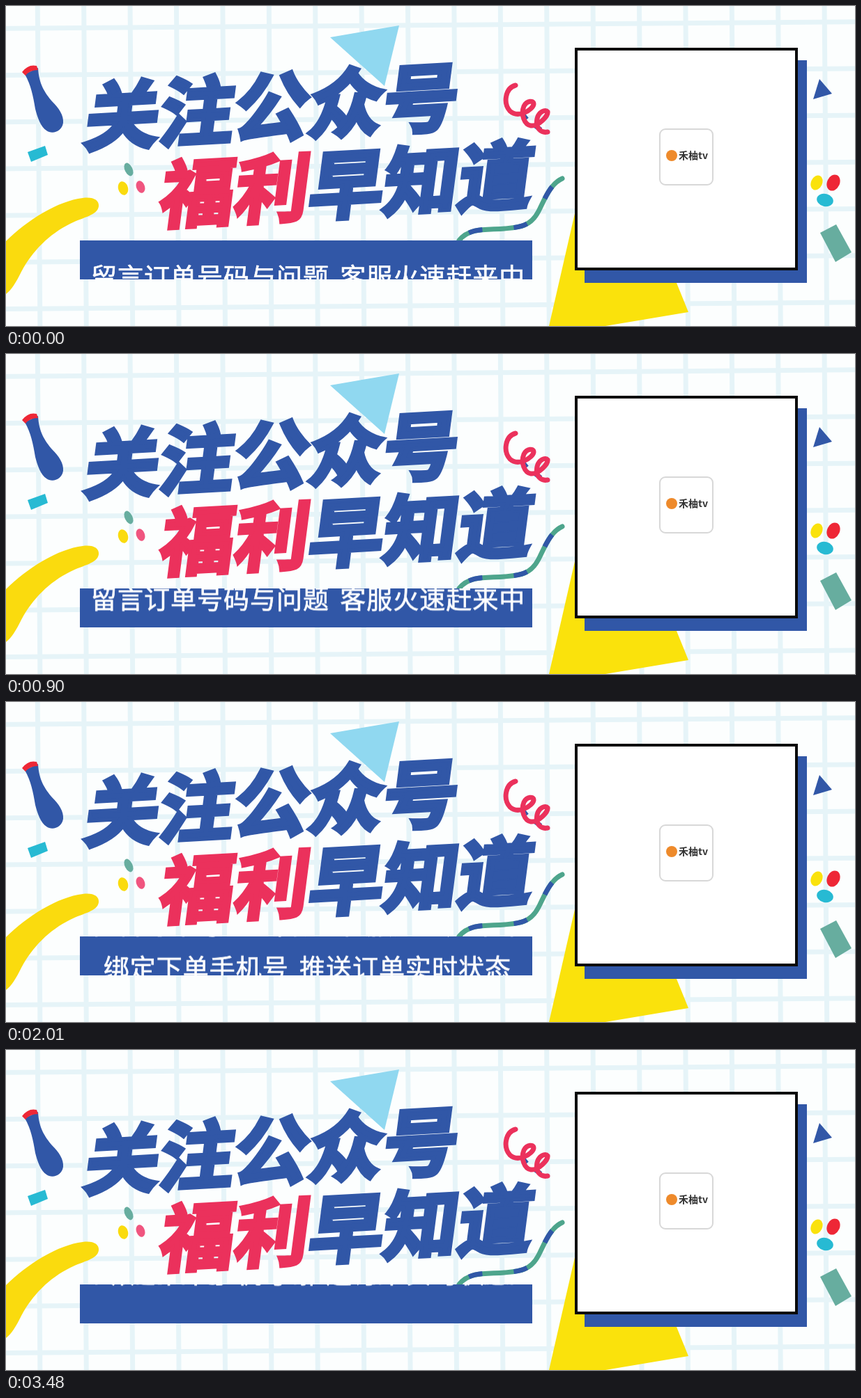
An HTML page that plays this animation: 1218 px wide and 460 px high, repeating every 3.51 s.

```html
<!DOCTYPE html>
<html lang="zh-CN">
<head>
<meta charset="utf-8">
<title>关注公众号 福利早知道</title>
<style>
  html, body { margin: 0; width: 100%; height: 100%; overflow: hidden; background: #fcfefe; }
  svg { display: block; width: 1218px; height: 460px; }
  text { font-family: "Noto Sans CJK SC", "Noto Sans CJK", "Noto Sans SC", sans-serif; }
  .blue { fill: #3157a7; }
  .red { fill: #ee2736; }
  .pink { fill: #eb315c; }
  .yellow { fill: #fae20c; }
  .cyan { fill: #27bad3; }
  .green { fill: #67ad9f; }
  .line { fill: none; stroke-width: 7; }
  .title { font-size: 107px; font-weight: 900; stroke-width: 6; stroke-linejoin: miter; }
  .title .blue { stroke: #3157a7; }
  .title .pink { stroke: #eb315c; stroke-width: 5; }
  .notice { font-size: 37px; font-weight: 500; letter-spacing: 1px; word-spacing: 6px; fill: #fff; stroke: #fff; stroke-width: .7; }
  .brand { font-size: 14px; font-weight: 700; fill: #333; }
</style>
</head>
<body>
<svg viewBox="0 0 1218 460">
  <defs>
    <pattern id="grid" width="66.4" height="67.2" patternUnits="userSpaceOnUse"
             patternTransform="translate(42 28.5) rotate(-.45)">
      <path d="M3.5 0V67.2M0 3.5H66.4" stroke="#e6f4f8" stroke-width="7"/>
    </pattern>
    <clipPath id="bar"><rect x="106" y="337" width="649" height="56"/></clipPath>
    <path id="ribbon" d="M650 337C665 318 690 322 715 320C735 318 752 318 764 295C772 280 780 256 798 248"/>
  </defs>

  <rect width="1218" height="460" fill="#fcfefe"/>
  <rect width="1218" height="460" fill="url(#grid)"/>

  <!-- confetti, left -->
  <path class="blue" d="M27 98L46 89C47 112 56 125 66 137C76 147 83 157 82 168C80 181 66 185 58 179C50 174 45 160 42 148C39 130 36 114 27 98Z"/>
  <path class="red" d="M23 95Q32 83 44 86L46 92Q34 92 28 100Z"/>
  <path class="cyan" d="M31 210L56 201L60 214L36 224Z"/>
  <ellipse class="green" rx="5.5" ry="10" transform="translate(176 235) rotate(-25)"/>
  <ellipse fill="#fadb0e" rx="7" ry="10" transform="translate(168 262) rotate(-15)"/>
  <ellipse fill="#f0557f" rx="6" ry="9" transform="translate(193 260) rotate(-20)"/>
  <path fill="#fadb0e" d="M0 338C30 308 75 280 110 276C125 274 134 279 133 288C131 301 112 303 92 313C62 328 38 352 22 382C14 398 8 408 0 414Z"/>
  <path fill="#90d8f0" d="M465 45L564 28L543 115Z"/>

  <!-- streamers -->
  <path class="line" stroke="#3157a7" d="M738 152L747 163M758 171L767 178"/>
  <path class="line" stroke="#eb315c" stroke-linecap="round"
        d="M731 114C716 118 713 140 723 151C735 162 756 149 757 141C757 135 747 136 743 144C738 156 744 171 753 172C764 173 778 158 777 152C774 148 764 152 762 162C759 176 768 183 777 181"/>
  <g class="line">
    <use href="#ribbon" stroke="#4ea58c" stroke-linecap="round"/>
    <use href="#ribbon" stroke="#3157a7" stroke-dasharray="0 18 20 45 20 45 20 99"/>
  </g>

  <!-- headline -->
  <g class="title">
    <text class="blue" transform="matrix(1 -.056 -.13 1 109.5 200)">关注公众号</text>
    <text transform="matrix(1 -.056 -.13 1 217 311.5)"><tspan class="pink">福利</tspan><tspan class="blue">早知道</tspan></text>
  </g>

  <!-- card -->
  <path class="yellow" d="M854 132L779 460H860L979 440Z"/>
  <rect class="blue" x="830" y="78" width="319" height="320"/>
  <rect x="818" y="62" width="316" height="316" fill="#fff" stroke="#0a0a0a" stroke-width="4"/>
  <rect x="938" y="177" width="76" height="80" rx="8" fill="#fff" stroke="#d8d8d8" stroke-width="2"/>
  <circle cx="955" cy="215" r="8" fill="#ee8a2b"/>
  <text class="brand" x="965" y="220">禾柚tv</text>

  <!-- confetti, right -->
  <path class="blue" d="M1167 105L1185 126L1158 134Z"/>
  <ellipse class="yellow" rx="8" ry="11" transform="translate(1163 254) rotate(25)"/>
  <ellipse class="red" rx="9" ry="12" transform="translate(1187 254) rotate(25)"/>
  <ellipse class="cyan" rx="12" ry="9" transform="translate(1175 279) rotate(15)"/>
  <path class="green" d="M1168 326L1191 314L1213 354L1190 368Z"/>

  <!-- scrolling notices -->
  <rect class="blue" x="106" y="337" width="649" height="56"/>
  <g class="notice" clip-path="url(#bar)">
    <text x="122">留言订单号码与问题 客服火速赶来中</text>
    <text x="139.8">绑定下单手机号 推送订单实时状态</text>
  </g>
</svg>
<script>
  const LOOP = 3510, TICK = 30, RISE = 1.25;
  const PARKED = 500;
  const notices = [
    { start: 0, end: 1680, baseline: 404.25 },
    { start: 1800, end: LOOP, baseline: 405.5 },
  ];
  const shift = y => `translateY(${y}px)`;

  document.querySelectorAll('.notice text').forEach((el, i) => {
    const { start, end, baseline } = notices[i];
    const ticks = (end - start) / TICK;
    const last = shift(baseline - ticks * RISE);
    const steps = [
      { offset: start / LOOP, transform: shift(baseline), easing: `steps(${ticks})` },
      { offset: end / LOOP, transform: last },
    ];
    if (start > 0) steps.unshift({ offset: 0, transform: shift(PARKED), easing: 'step-end' });
    if (end < LOOP) steps.push({ offset: 1, transform: last });
    el.animate(steps, { duration: LOOP, iterations: Infinity });
  });
</script>
</body>
</html>
```
